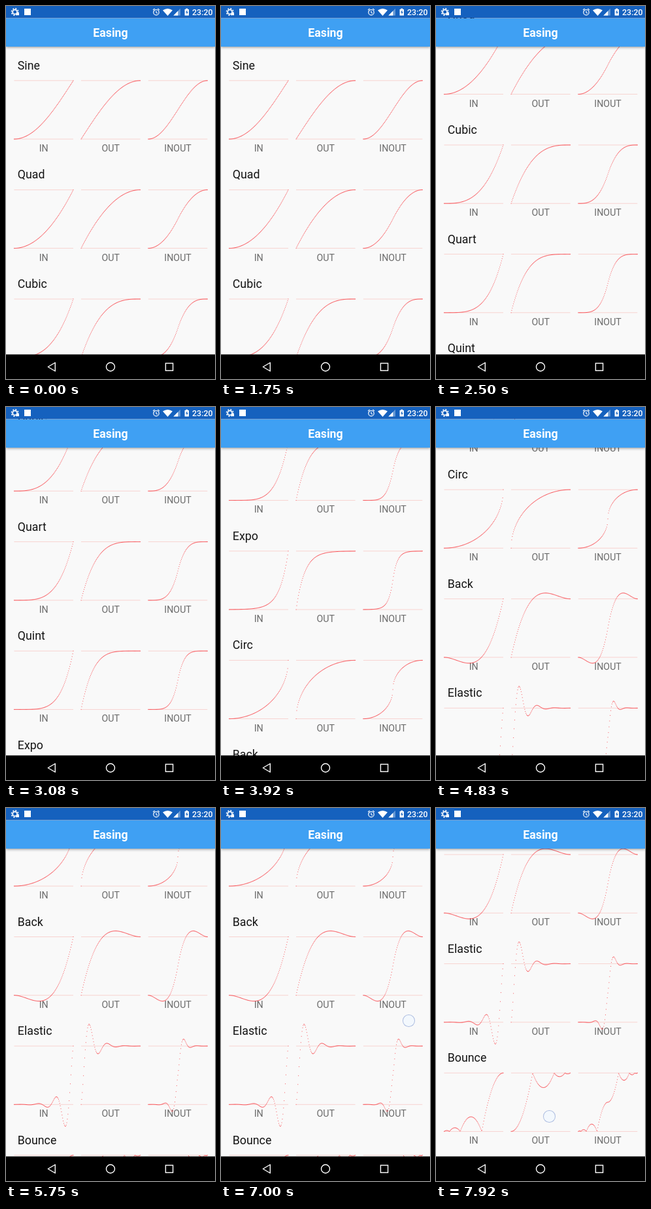
These frames come from a looping animation (320x569 px, 8000 ms). An HTML page:

```html
<!DOCTYPE html>
<html lang="en">
<head>
<meta charset="utf-8">
<title>Easing</title>
<style>
  html, body { margin: 0; width: 100%; height: 100%; overflow: hidden; }
  body { position: relative; background: #f9f9f9; font-family: Roboto, sans-serif; }
  #stage { position: absolute; left: 0; top: 0; width: 320px; height: 569px; overflow: hidden; }
  svg { position: absolute; left: 0; top: 0; }
  text { dominant-baseline: alphabetic; }
  .name { font-size: 17.78px; fill: #141414; }
  .label { font-size: 14.22px; fill: #6b6b6b; text-anchor: middle; }
  .rule { stroke: #f8d3d0; stroke-width: 1; }
  .dots { stroke: #f8454b; stroke-width: .95; fill: none; }
  .bar { position: absolute; left: 0; width: 320px; }
  #header { top: 18.5px; height: 43.5px; background: #3fa0f3; box-shadow: 0 1px 4px rgba(0,0,0,.42);
    color: #fff; font: 700 17.78px/45px Roboto, sans-serif; text-align: center; }
  #touch { position: absolute; left: -9px; top: -9px; width: 16.6px; height: 16.6px; border-radius: 50%;
    border: 1.2px solid rgba(150,170,215,.75); background: rgba(240,247,255,.65); }
</style>
</head>
<body>
<div id="stage">
  <svg width="320" height="569"><g id="list"></g></svg>
  <div id="touch"></div>
  <div id="header" class="bar">Easing</div>
  <svg width="320" height="569">
    <rect width="320" height="18.5" fill="#1561be"/>
    <g fill="none" stroke="#fff">
      <circle cx="13.6" cy="9" r="3.4" stroke-width="1.7"/>
      <circle cx="13.6" cy="9" r="5.2" stroke-width="1.5" stroke-dasharray="2.1 1.98"/>
      <circle cx="230" cy="9.7" r="4.2" stroke-width="1.2"/>
      <path d="M230 7.2v2.8l2 1.2M225 6.2l2.6-2.2M235 6.2l-2.6-2.2" stroke-width="1.1"/>
    </g>
    <g fill="#fff">
      <rect x="16" y="10.5" width="4" height="3.6"/>
      <rect x="28" y="4" width="10" height="10"/>
      <path d="M240 6.6Q247.5 1.6 255 6.6L247.5 15Z"/>
      <path d="M267 3.8v10.6H256.4Z" opacity=".35"/>
      <path d="M263.4 7.4v7H256.4Z"/>
      <path d="M273.6 5h1.7V3.8h3V5h1.7v9.6h-6.4Z"/>
      <text x="285" y="13.6" font-size="12.44" font-weight="500">23:20</text>
    </g>
    <path d="M277.4 6l-2.2 4h1.4v3l2.2-4h-1.4Z" fill="#1561be"/>
    <rect y="531.5" width="320" height="37.5" fill="#000"/>
    <g fill="none" stroke="#fff" stroke-width="1.4">
      <path d="M75.3 544v13L64.3 550.5Z" stroke-linejoin="round"/>
      <circle cx="160" cy="550.5" r="6.5"/>
      <rect x="244.4" y="545" width="11.2" height="11.2"/>
    </g>
  </svg>
</div>
<script>
const PITCH = 166.6, HEIGHT = 89.2, WIDTH = 90.6, TOP = 113.8;
const COLUMNS = [12.4, 115, 217.8];
const FPS = 12, FRAMES = 96;

const power = n => t => t ** n;
const back = s => t => t * t * ((s + 1) * t - s);
const elastic = p => t => t === 0 || t === 1 ? t :
  -(2 ** (10 * (t - 1))) * Math.sin((t - 1 - p / 4) * 2 * Math.PI / p);

function bounceOut(t) {
  const k = 7.5625, d = 2.75;
  if (t < 1 / d) return k * t * t;
  if (t < 2 / d) return k * (t - 1.5 / d) ** 2 + .75;
  if (t < 2.5 / d) return k * (t - 2.25 / d) ** 2 + .9375;
  return k * (t - 2.625 / d) ** 2 + .984375;
}

// Name, ease-in, and the ease-in used for the in-out form where it differs
const EASINGS = [
  ['Sine', t => 1 - Math.cos(t * Math.PI / 2)],
  ['Quad', power(2)],
  ['Cubic', power(3)],
  ['Quart', power(4)],
  ['Quint', power(5)],
  ['Expo', t => t === 0 ? 0 : 2 ** (10 * (t - 1))],
  ['Circ', t => 1 - Math.sqrt(1 - t * t)],
  ['Back', back(1.70158), back(1.70158 * 1.525)],
  ['Elastic', elastic(.3), elastic(.45)],
  ['Bounce', t => 1 - bounceOut(1 - t)]
];

const toOut = ease => t => 1 - ease(1 - t);
const toInOut = ease => t => t < .5 ? ease(2 * t) / 2 : 1 - ease(2 - 2 * t) / 2;

function plot(ease, x, top) {
  const steps = 100;
  let d = '';
  for (let i = 0; i <= steps; i++) {
    const t = i / steps;
    d += `M${(x + t * WIDTH - .45).toFixed(2)} ${(top + (1 - ease(t)) * HEIGHT).toFixed(2)}h.95`;
  }
  return `<path class="dots" d="${d}"/>`;
}

function section([name, easeIn, easeBoth = easeIn], index) {
  const top = TOP + index * PITCH, bottom = top + HEIGHT;
  const forms = [['IN', easeIn], ['OUT', toOut(easeIn)], ['INOUT', toInOut(easeBoth)]];
  return `<text class="name" x="17.8" y="${top - 17}">${name}</text>` + forms.map(([label, ease], i) => {
    const x = COLUMNS[i];
    return `<path class="rule" d="M${x} ${top}h${WIDTH}M${x} ${bottom}h${WIDTH}"/>
      <text class="label" x="${x + WIDTH / 2}" y="${bottom + 19}">${label}</text>` + plot(ease, x, top);
  }).join('');
}

const list = document.getElementById('list');
const touch = document.getElementById('touch');
list.innerHTML = EASINGS.map(section).join('');

// Each swipe: first frame, finger position, scroll offset per frame
const SWIPES = [
  { start: 26, x: 290, y: 400, offsets: [0, 20, 90, 170, 235, 285, 325, 355, 377, 393, 403, 408] },
  { start: 40, x: 290, y: 400, offsets: [408, 430, 500, 570, 625, 668, 702, 727, 743, 755, 763, 767] },
  { start: 53, x: 290, y: 390, offsets: [767, 785, 840, 895, 945, 987.3, 1025, 1053, 1073, 1083.5] },
  { start: 84, x: 287, y: 324, offsets: [1083.5, 1092, 1125, 1160, 1187, 1203, 1209] }
];
const TOUCH_FRAMES = 4;
const NEXT_TOUCH = { start: 94, x: 173, y: 470 };

function fingerAt(frame, swipe, offset) {
  if (frame >= NEXT_TOUCH.start) return NEXT_TOUCH;
  if (!swipe || frame - swipe.start >= TOUCH_FRAMES) return null;
  return { x: swipe.x, y: swipe.y - (offset - swipe.offsets[0]) };
}

function draw() {
  // A small lead keeps rounded timestamps on the right step
  const frame = Math.floor((performance.now() + 4) * FPS / 1000) % FRAMES;
  const swipe = SWIPES.filter(s => s.start <= frame).pop();
  const offset = swipe ? swipe.offsets[Math.min(frame - swipe.start, swipe.offsets.length - 1)] : 0;
  const finger = fingerAt(frame, swipe, offset);
  list.setAttribute('transform', `translate(0 ${-offset})`);
  touch.style.display = finger ? 'block' : 'none';
  if (finger) touch.style.transform = `translate(${finger.x}px, ${finger.y}px)`;
  requestAnimationFrame(draw);
}
draw();
</script>
</body>
</html>
```
